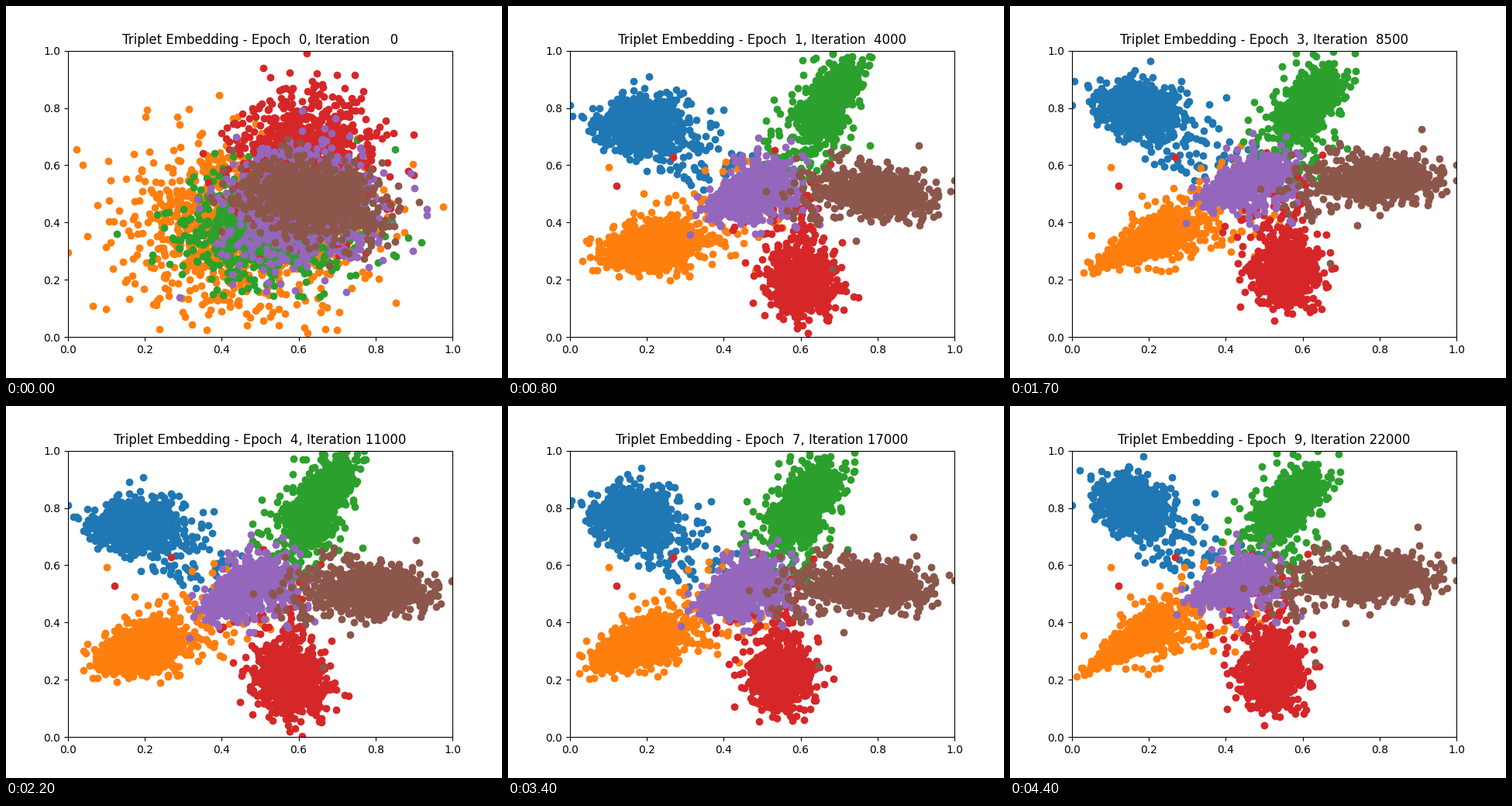
Animation of 640x480 px, one loop 7400 ms. Source, as a matplotlib script:

```python
import numpy as np
import matplotlib.pyplot as plt
from matplotlib.animation import FuncAnimation

STEPS = 45               # distinct pictures; the last one is held
FRAMES = 74
ITERS_PER_STEP = 500
ITERS_PER_EPOCH = 2250
SETTLED = 8              # step at which the classes have separated
SWAY_PERIOD = 14.6
MIDDLE = np.array([335, 240])

fig, ax = plt.subplots(figsize=(6.4, 4.8), dpi=100)
ax.set_xlim(0, 1)
ax.set_ylim(0, 1)
title = ax.set_title("")


def to_data(x, y):
    """Stage pixels to axes units, folded back inside the unit square."""
    fold = lambda v: 1 - np.abs(1 - np.abs(v))
    return fold((x - 80) / 496), fold((427.2 - y) / 369.6)


def lerp(a, b, t):
    return a + (b - a) * t


class Cluster:
    """Points around a tapered spine (x0, y0, w0, x1, y1, w1) in pixels.

    The spine grows from its untrained shape, then sways between two poses.
    """

    def __init__(self, label, count, start, low, high, strays=()):
        rng = np.random.default_rng(40 + label)
        self.start, self.low, self.high = np.array([start, low, high], float)
        self.strays = np.array(strays, float).reshape(-1, 2)
        self.u, self.v = rng.normal(0, 0.43, (2, count))
        loose = rng.random(count) < 0.11
        self.pull = loose * rng.uniform(0, 0.75, count)
        self.noise = loose * rng.normal(0, 27, (2, count))
        self.jitter = rng.normal(0, 3, (STEPS, 6))
        self.line, = ax.plot([], [], "o", color=f"C{label}")

    def update(self, step):
        grown = 1 - (1 - min(step / SETTLED, 1)) ** 4
        sway = (1 - np.cos(2 * np.pi * (step - SETTLED) / SWAY_PERIOD)) / 2
        pose = lerp(self.low, self.high, sway) + self.jitter[step]
        x0, y0, w0, x1, y1, w1 = lerp(self.start, pose, grown)
        dx, dy = x1 - x0, y1 - y0
        length = np.hypot(dx, dy)

        t = (self.u + 1) / 2
        off = self.v * np.maximum(lerp(w0, w1, t), 5)
        x = x0 + dx * t - dy / length * off
        y = y0 + dy * t + dx / length * off
        x = lerp(x, MIDDLE[0], self.pull * grown) + self.noise[0] * grown
        y = lerp(y, MIDDLE[1], self.pull * grown) + self.noise[1] * grown

        # the inner classes slowly drift left
        age = (step - 26) / 36 * grown
        x = x - 28 * age * np.sin(np.pi * (x - 80) / 496)

        stray_x, stray_y = lerp(MIDDLE, self.strays, grown).T
        self.line.set_data(*to_data(np.append(x, stray_x), np.append(y, stray_y)))


clusters = [
    Cluster(0, 980, start=(300, 240, 45, 430, 260, 45),
            low=(109, 158, 32, 218, 153, 44), high=(117, 116, 36, 213, 148, 42),
            strays=[(80, 128)]),
    Cluster(1, 1135, start=(145, 300, 130, 475, 260, 125),
            low=(115, 330, 26, 232, 295, 36), high=(112, 335, 10, 233, 266, 33),
            strays=[(130, 208)]),
    Cluster(2, 1032, start=(220, 300, 75, 480, 260, 85),
            low=(368, 175, 35, 440, 72, 20), high=(332, 172, 27, 410, 85, 32)),
    Cluster(3, 1010, start=(360, 290, 100, 415, 105, 95),
            low=(340, 388, 47, 398, 322, 48), high=(350, 390, 46, 345, 295, 42),
            strays=[(140, 232), (213, 195)]),
    Cluster(4, 982, start=(275, 260, 85, 490, 252, 85),
            low=(250, 262, 22, 357, 212, 42), high=(245, 252, 15, 347, 212, 28)),
    Cluster(5, 892, start=(300, 228, 56, 488, 268, 56),
            low=(402, 236, 34, 540, 246, 30), high=(397, 227, 26, 545, 218, 32),
            strays=[(576, 225)]),
]


def draw(frame):
    step = min(frame, STEPS - 1)
    iteration = step * ITERS_PER_STEP
    epoch = iteration // ITERS_PER_EPOCH
    title.set_text(f"Triplet Embedding - Epoch {epoch:2d}, Iteration {iteration:5d}")
    for cluster in clusters:
        cluster.update(step)
    return [title] + [c.line for c in clusters]


anim = FuncAnimation(fig, draw, frames=FRAMES, interval=100,
                     init_func=lambda: draw(0), repeat=True, repeat_delay=0)
plt.show()
```
